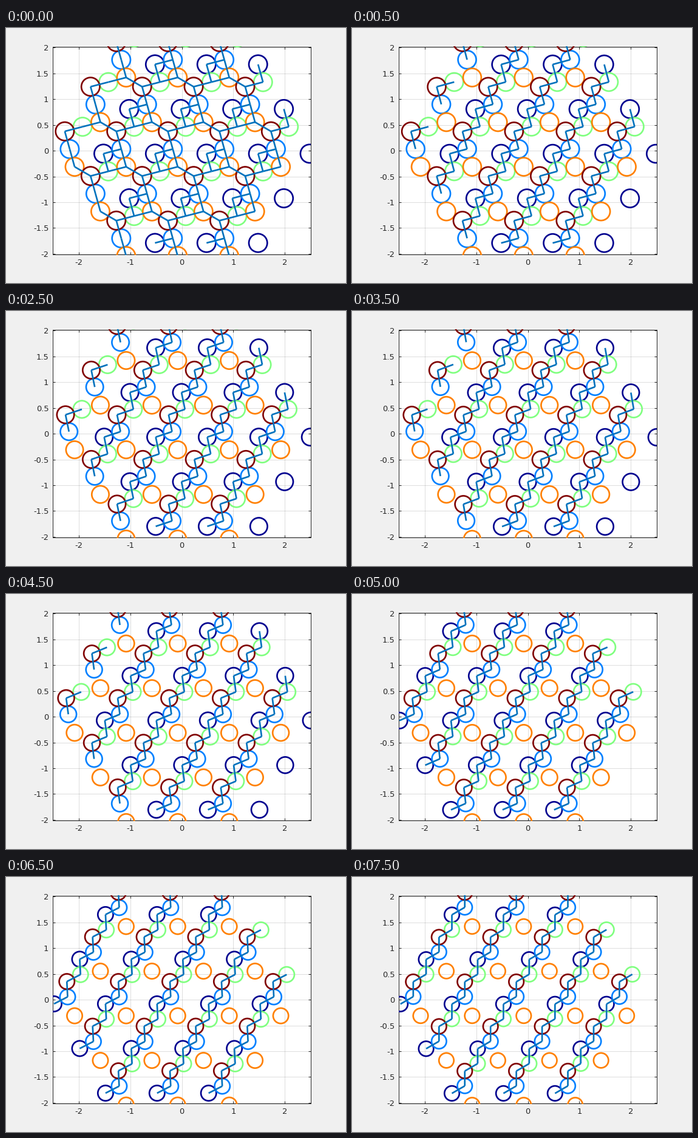
Write a matplotlib script that moves like this. It is 560 px wide and 420 px high and loops after 8000 ms.

```python
import numpy as np
import matplotlib.pyplot as plt
from matplotlib.animation import FuncAnimation
from matplotlib.collections import LineCollection

W, H, DPI = 560, 420, 100
FRAMES, INTERVAL = 16, 500
WRAP = 10          # step at which the navy disc re-enters its cell from the left
TOUCH = 1.005      # tolerance for counting two discs as touching
D_START, D_END = 0.3568, 0.2887
UNIT = 84.9        # pixels per data unit
LEFT, TOP, BOX_W, BOX_H = 77.3, 30.95, 5 * UNIT, 342.3
PT = 72 / DPI      # points per pixel
INK = (0.15, 0.15, 0.15)
COLORS = [(0, 0, 0.5625), (0, 0.5, 1), (0.5, 1, 0.5), (1, 0.5, 0), (0.5, 0, 0)]

plt.rcParams["font.family"] = "DejaVu Sans"
plt.rcParams["axes.unicode_minus"] = False

# Hexagonal patch of a triangular lattice
A1 = np.array([1, 0])
A2 = np.array([0.5, np.sqrt(3) / 2])
SITES = np.array([i * A1 + j * A2
                  for j in range(-2, 3) for i in range(-2, 3) if abs(i + j) <= 2])
HALF = A2 / 4
ACROSS = np.array([np.sqrt(3) / 2, -0.5])
CENTER = np.array([-0.160, 0.312])


def diameter(step):
    return D_START + (D_END - D_START) * step / (FRAMES - 1)


def fold(step):
    """Half width of the zigzag whose bonds equal the disc diameter."""
    return ACROSS * np.sqrt(diameter(step) ** 2 - 0.25 ** 2) / 2


# The orange disc stays where it first touches its three neighbours
LOOSE = CENTER + 3 * fold(0) + 2 * HALF - A2


def discs(step):
    """Disc centres, grouped by kind."""
    h = fold(step)
    red = CENTER - h
    navy = red - 2 * HALF + (A1 if step < WRAP else 0)
    blue, green = CENTER + h - HALF, CENTER + h + HALF
    return np.concatenate([SITES + p for p in (navy, blue, green, LOOSE, red)])


def bonds(pts, reach):
    dist = np.hypot(*(pts[:, None] - pts[None]).T)
    return [pts[[a, b]] for a, b in np.argwhere(np.triu(dist < reach, 1))]


def ring_area(step):
    return (diameter(step) * UNIT * PT) ** 2


fig = plt.figure(figsize=(W / DPI, H / DPI), dpi=DPI, facecolor="0.94")
ax = fig.add_axes([LEFT / W, 1 - (TOP + BOX_H) / H, BOX_W / W, BOX_H / H])
y_max = BOX_H / UNIT / 2
ax.set(xlim=(-2.5, 2.5), ylim=(-y_max, y_max))
ax.set_axisbelow(True)
ax.grid(color=INK, alpha=0.15, lw=PT)

xt, yt = np.arange(-2, 3), np.arange(-2, 2.1, 0.5)
ax.set_xticks(xt, [f"{v:g}" for v in xt])
ax.set_yticks(yt, [f"{v:g}" for v in yt])
ax.tick_params(direction="in", top=True, right=True, length=4 * PT, width=PT,
               color=INK, labelcolor=INK, labelsize=13 * PT)
ax.tick_params(axis="x", pad=7 * PT)
ax.tick_params(axis="y", pad=7 * PT)
for spine in ax.spines.values():
    spine.set(color=INK, linewidth=PT, zorder=1)

rings = ax.scatter(*discs(0).T, s=ring_area(0), facecolors="none",
                   edgecolors=np.repeat(COLORS, len(SITES), axis=0),
                   linewidths=2.67 * PT, zorder=3)
links = LineCollection([], colors=[(0, 0.447, 0.741)], linewidths=2.67 * PT,
                       capstyle="butt", zorder=4)
ax.add_collection(links, autolim=False)
for art in (rings, links):
    art.set_clip_box(ax.bbox.padded(0, 1))


def update(step):
    pts = discs(step)
    rings.set_offsets(pts)
    rings.set_sizes([ring_area(step)])
    links.set_segments(bonds(pts, TOUCH * diameter(step)))
    return rings, links


anim = FuncAnimation(fig, update, frames=FRAMES, interval=INTERVAL,
                     repeat=True, repeat_delay=0, blit=False)
plt.show()
```
